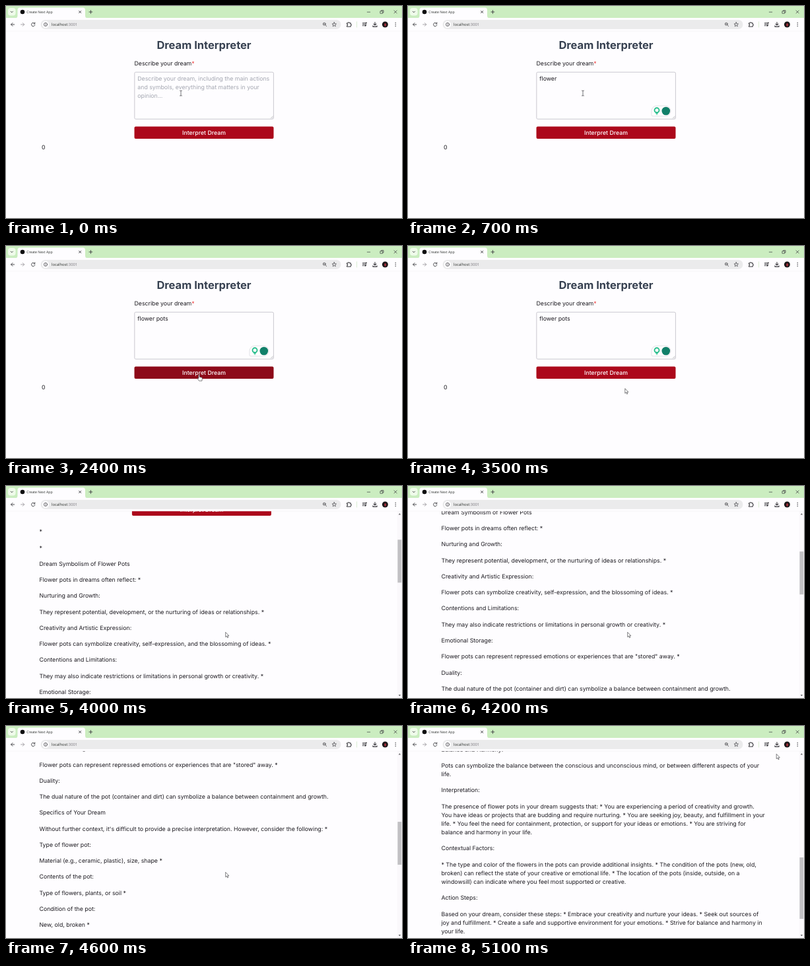
An HTML page that plays this animation: 600 px wide and 321 px high, repeating every 5200 ms.

```html
<!DOCTYPE html>
<html lang="en">
<head>
<meta charset="utf-8">
<title>Dream Interpreter</title>
<style>
html, body { margin: 0; width: 100%; height: 100%; overflow: hidden; background: #fefdff; }
svg { display: block; width: 600px; height: 321px; }
text { font-family: Inter, sans-serif; font-size: 8.785px; fill: #1c1a20; text-rendering: geometricPrecision; white-space: pre; }
.ui { font-family: "Open Sans", sans-serif; font-size: 5.2px; fill: #2b2f2b; }
.line { fill: none; stroke: #3c3c40; stroke-width: .9; stroke-linecap: round; stroke-linejoin: round; }
.thin { stroke-width: .7; }
.bold { stroke-width: 1.1; }
</style>
</head>
<body>
<svg viewBox="0 0 600 321" xmlns="http://www.w3.org/2000/svg">
  <defs><clipPath id="view"><rect y="38" width="600" height="283"/></clipPath></defs>
  <rect width="600" height="321" fill="#fefdff"/>

  <g clip-path="url(#view)">
    <g id="page">
      <text x="300" y="65.3" text-anchor="middle" style="font-size:16.5px;font-weight:700;fill:#374151">Dream Interpreter</text>
      <text x="194.5" y="90">Describe your dream<tspan fill="#ef4444">*</tspan></text>
      <rect x="194.8" y="100.2" width="210.6" height="71" rx="1.8" fill="#fefdff" stroke="#bdbcc4" stroke-width=".8"/>
      <path d="M401 170.2l3.6-3.6M403 170.2l1.6-1.6" stroke="#8a8a8e" stroke-width=".5"/>
      <g id="hint"></g>
      <text id="typed" x="199.3" y="112.6"></text>
      <g id="helper">
        <path d="M376.5 151.2h13.7a7.8 7.8 0 0 1 0 15.6h-19.2a2 2 0 0 1-2-2v-6a7.6 7.6 0 0 1 7.5-7.6z" fill="#fff" stroke="#d5d5dc" stroke-width=".7"/>
        <circle cx="377" cy="157.8" r="3.5" fill="#fff" stroke="#27bd8c" stroke-width="1.9"/>
        <path d="M375.3 162.4h3.4M375.7 164h2.6" stroke="#27bd8c" stroke-width="1.1"/>
        <circle cx="390.8" cy="159" r="6.3" fill="#12806a"/>
      </g>
      <rect id="button" x="194.5" y="182.5" width="211" height="18.6" rx="2"/>
      <text x="300" y="195" text-anchor="middle" style="font-weight:500;fill:#fff">Interpret Dream</text>
      <text id="zero" x="54.1" y="217.3">0</text>
      <g id="first"></g>
    </g>
    <g id="second"></g>
    <g id="bar">
      <rect x="592.8" y="38" width="7.2" height="283" fill="#faf8fb"/>
      <path d="M594.7 43.4h3.4l-1.7-2.2zM594.7 316h3.4l-1.7 2.2z" fill="#606064"/>
      <rect id="thumb" x="593.4" width="5.8" fill="#c1c0c3"/>
    </g>
  </g>

  <rect width="600" height="18.5" fill="#cbedc0"/>
  <rect y="18" width="600" height="20" fill="#fefdff"/>
  <path d="M0 38h600" stroke="#eceaee" stroke-width=".5"/>
  <rect x="3" y="3" width="11.6" height="11.6" rx="4" fill="#effbea"/>
  <path class="line" d="M7.2 8.2l1.6 1.6 1.6-1.6"/>
  <path d="M14 18.2q3.5 0 3.5-3.5V6q0-3.5 3.5-3.5h95.5q3.5 0 3.5 3.5v8.7q0 3.5 3.5 3.5z" fill="#fefdff"/>
  <circle cx="25" cy="9" r="3.3" fill="#0b0b0c"/>
  <text class="ui" x="31.2" y="11">Create Next App</text>
  <path class="line" d="M110.6 7.4l3.2 3.2m0-3.2l-3.2 3.2M126 9h4.8M128.4 6.600v4.8"/>
  <path class="line thin" d="M547.3 9.2h4.4M567.3 7.8h3.4v3.4h-3.4zM568.6 7.6v-1h3.4v3.4h-1M588 6.8l4.200 4.2m0-4.2L588 11"/>

  <path class="line" d="M12.7 28H7.6m2.4-2.4L7.6 28l2.4 2.4"/>
  <path class="line" style="stroke:#9b999f" d="M22.6 28h5.1m-2.4-2.4l2.4 2.4-2.4 2.4"/>
  <path class="line" d="M43.3 26.4a2.7 2.7 0 1 0 .5 2.3M43.8 25v1.9h-1.9"/>
  <rect x="52.5" y="21" width="455" height="14" rx="7" fill="#ebebec"/>
  <circle cx="60" cy="28" r="5.3" fill="#fefdff"/>
  <circle class="line thin" cx="60" cy="28" r="2.6"/>
  <path class="line thin" d="M60 27.9v1.3M60 26.6v.1"/>
  <text class="ui" x="69" y="30" style="font-size:5.8px">localhost<tspan fill="#77747b">:3001</tspan></text>
  <circle class="line thin" cx="482.3" cy="27.3" r="2"/>
  <path class="line thin" d="M483.9 28.9l1.8 1.8M481.4 27.3h1.8"/>
  <path id="star" class="line thin"/>
  <path class="line bold" d="M516.6 25.8h1.7a1.1 1.1 0 0 1 2.2 0h1.7v1.7a1.1 1.1 0 0 1 0 2.2v1.6h-5.6v-1.6a1.1 1.1 0 0 0 0-2.2z"/>
  <path d="M531.5 23.5v9" stroke="#d6ebcf" stroke-width=".9"/>
  <path class="line bold" d="M540.4 25.7h4M540.4 27.7h3M540.4 29.7h1.5M545.2 29.6v-4.2h1.2"/>
  <circle cx="544.3" cy="29.6" r="1.2" fill="#3c3c40"/>
  <path class="line bold" d="M559 24.6v4.4m-2-1.9l2 2 2-2M556 29.8v1.6h6v-1.6"/>
  <circle cx="574.4" cy="28" r="4.5" fill="#1d1719"/>
  <ellipse cx="574.6" cy="28.5" rx="1.5" ry="2.3" fill="#a4303a"/>
  <path d="M590.2 25.5v.01M590.2 28v.01M590.2 30.5v.01" stroke="#3c3c40" stroke-width="1.4" stroke-linecap="round"/>

  <g id="cursor" stroke-linejoin="round">
    <path id="ibeam" class="line thin" d="M-1.5-3.9h1.1l.4.4.4-.4h1.1M0-3.5v7M-1.5 3.9h1.1l.4-.4.4.4h1.1"/>
    <path id="arrow" fill="#fff" stroke="#2a2a2e" stroke-width=".6" d="M0 0v7.3l1.7-1.5 1.1 2.6 1.2-.5-1.1-2.5h2.2z"/>
    <path id="hand" fill="#fff" stroke="#2a2a2e" stroke-width=".6" d="M-.8 5.6V.7a.8.8 0 0 1 1.6 0v2.7l3 .6q1 .3 1 1.3l-.5 3.9h-4.4l-2.2-3q-.5-1 .4-1z"/>
  </g>
</svg>
<script>
const LOOP = 5200, STEP = 100, ROW = 13.23, GAP = 11.03;
const $ = id => document.getElementById(id);
const show = (id, on) => $(id).setAttribute('display', on ? 'inline' : 'none');
const move = (id, x, y) => $(id).setAttribute('transform', `translate(${x} ${y})`);

function write(group, x, y, paras) {
  for (const para of paras) {
    for (const row of para.split('\n')) {
      const el = document.createElementNS('http://www.w3.org/2000/svg', 'text');
      el.setAttribute('x', x);
      el.setAttribute('y', y);
      el.textContent = row;
      $(group).append(el);
      y += ROW;
    }
    y += GAP;
  }
}

write('hint', 199.3, 112.6, ['Describe your dream, including the main actions\nand symbols, everything that matters in your\nopinion...']);
for (const row of $('hint').children) row.style.fill = '#a3a6b0';

write('first', 54.1, 228.4, [
  '*', '*',
  'Dream Symbolism of Flower Pots',
  'Flower pots in dreams often reflect: *',
  'Nurturing and Growth:',
  'They represent potential, development, or the nurturing of ideas or relationships. *',
  'Creativity and Artistic Expression:',
  'Flower pots can symbolize creativity, self-expression, and the blossoming of ideas. *',
  'Contentions and Limitations:',
  'They may also indicate restrictions or limitations in personal growth or creativity. *',
  'Emotional Storage:',
  'Flower pots can represent repressed emotions or experiences that are "stored" away. *',
  'Duality:',
  'The dual nature of the pot (container and dirt) can symbolize a balance between containment and growth.',
  'Specifics of Your Dream',
  "Without further context, it's difficult to provide a precise interpretation. However, consider the following: *",
  'Type of flower pot:',
  'Material (e.g., ceramic, plastic), size, shape *',
  'Contents of the pot:',
  'Type of flowers, plants, or soil *',
  'Condition of the pot:',
  'New, old, broken *',
  'Location of the pot:',
  'Inside, outside, on a windowsill *',
  'Interpretation'
]);

write('second', 50.5, 38.5, [
  'Balance and Harmony:',
  'Pots can symbolize the balance between the conscious and unconscious mind, or between different aspects of your\nlife.',
  'Interpretation:',
  'The presence of flower pots in your dream suggests that: * You are experiencing a period of creativity and growth.\nYou have ideas or projects that are budding and require nurturing. * You are seeking joy, beauty, and fulfillment in your\nlife. * You feel the need for containment, protection, or support for your ideas or emotions. * You are striving for\nbalance and harmony in your life.',
  'Contextual Factors:',
  '* The type and color of the flowers in the pots can provide additional insights. * The condition of the pots (new, old,\nbroken) can reflect the state of your creative or emotional life. * The location of the pots (inside, outside, on a\nwindowsill) can indicate where you feel most supported or creative.',
  'Action Steps:',
  'Based on your dream, consider these steps: * Embrace your creativity and nurture your ideas. * Seek out sources of\njoy and fulfillment. * Create a safe and supportive environment for your emotions. * Strive for balance and harmony in\nyour life.'
]);

const star = [...Array(10).keys()].map(i => {
  const r = i % 2 ? 1.5 : 3.4, a = i * Math.PI / 5;
  return `${497.3 + r * Math.sin(a)} ${28.1 - r * Math.cos(a)}`;
});
$('star').setAttribute('d', `M${star.join('L')}z`);

// Linear interpolation over [time, ...values] keys
function at(keys, t) {
  const i = keys.findIndex(k => k[0] > t);
  if (i < 0) return keys[keys.length - 1].slice(1);
  const [a, b] = [keys[i - 1], keys[i]], u = (t - a[0]) / (b[0] - a[0]);
  return a.slice(1).map((v, n) => v + (b[n + 1] - v) * u);
}

const POINTER = [[0, 265, 132], [900, 265, 132], [1200, 292.6, 195], [3100, 292.6, 195],
  [3400, 328.8, 215.8], [3600, 328.8, 215.8], [3900, 332.7, 221.4], [4800, 332.7, 221.4], [5100, 558.2, 42.4]];
const SCROLL = [[0, 0], [3600, 0], [4000, 156], [4200, 234], [4600, 433.7], [4700, 484]];
const WORDS = 'flower pots', ANSWER = 3600, SWAP = 4800;

function draw(t) {
  const [x, y] = at(POINTER, t), [scroll] = at(SCROLL, t);
  const answered = t >= ANSWER, swapped = t >= SWAP;
  const hover = !answered && y > 182 && y < 201;
  const ibeam = t < 1200 && y < 172;

  const count = Math.max(0, Math.min(WORDS.length, Math.ceil((t - 300) / 60)));
  $('typed').textContent = WORDS.slice(0, count);
  show('hint', !count);
  show('helper', count);
  $('button').setAttribute('fill', hover ? '#8d0a19' : '#ac081b');

  show('zero', !answered);
  show('first', answered);
  show('page', !swapped);
  show('second', swapped);
  move('page', answered ? -3.6 : 0, -scroll);

  show('bar', answered);
  $('thumb').setAttribute('y', swapped ? 199 : 45.5 + scroll * .2296);
  $('thumb').setAttribute('height', swapped ? 93 : 65);

  move('cursor', x, y);
  show('ibeam', ibeam);
  show('hand', hover);
  show('arrow', !ibeam && !hover);
}

const start = performance.now();
function tick() {
  const t = (performance.now() - start) % LOOP;
  draw(Math.floor(t / STEP) * STEP);
  requestAnimationFrame(tick);
}
draw(0);
tick();
</script>
</body>
</html>
```
